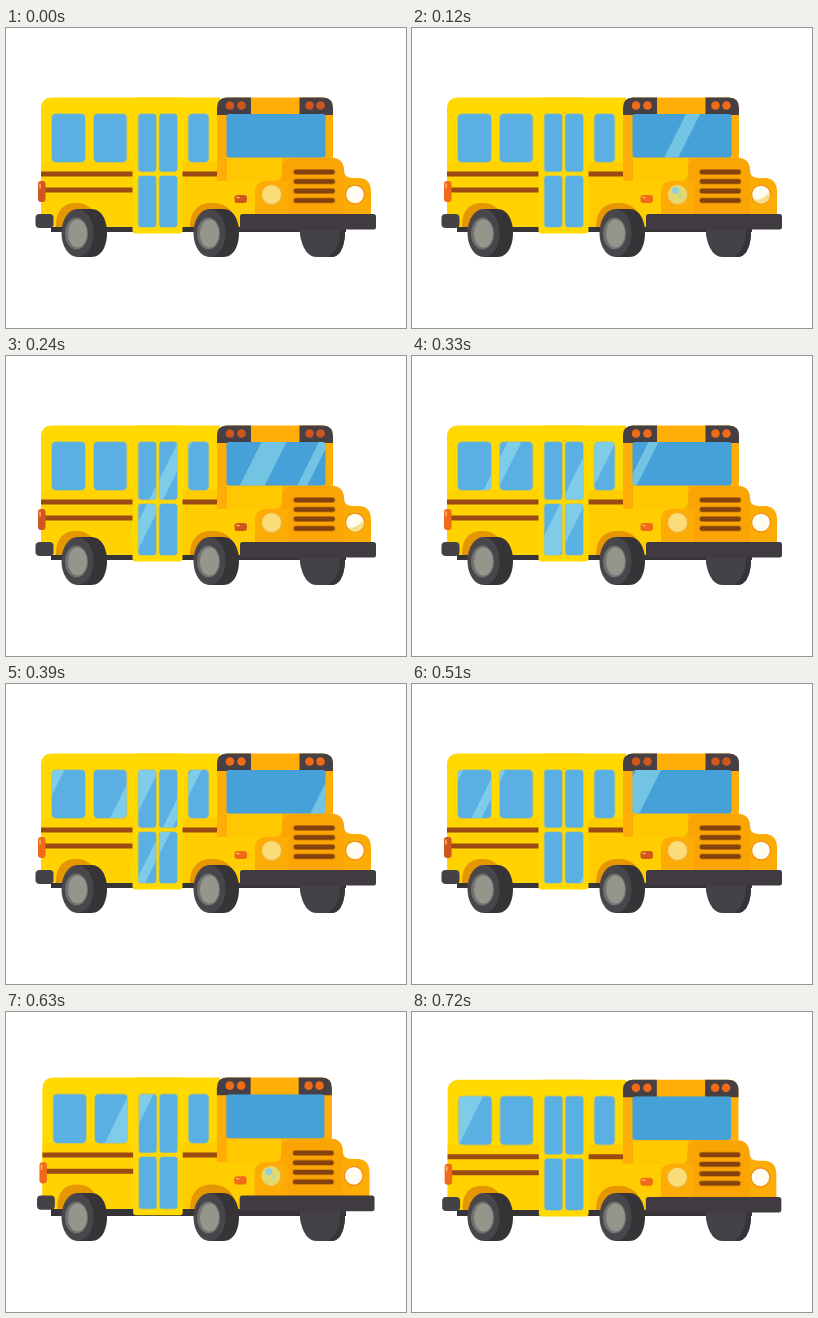
An HTML page that plays this animation: 400x300 px, repeating every 750 ms.

```html
<!DOCTYPE html>
<html lang="en">
<head>
<meta charset="utf-8">
<title>School bus</title>
<style>
  html, body { margin: 0; width: 100%; height: 100%; overflow: hidden; background: #fff; }
  svg { display: block; width: 400px; height: 300px; }
</style>
</head>
<body>
<svg viewBox="0 0 400 300">
  <defs>
    <g id="panes">
      <rect x="46" y="86" width="33" height="48" rx="4"/>
      <rect x="88" y="86" width="32.500" height="48" rx="4"/>
      <rect x="182.500" y="86" width="20" height="48" rx="4"/>
      <rect x="132.500" y="86" width="17.500" height="57.500" rx="3"/>
      <rect x="153.500" y="86" width="17.500" height="57.500" rx="3"/>
      <rect x="132.500" y="148" width="17.500" height="51" rx="3"/>
      <rect x="153.500" y="148" width="17.500" height="51" rx="3"/>
    </g>
    <clipPath id="glass">
      <rect x="46" y="86" width="33" height="48" rx="4"/>
      <rect x="88" y="86" width="32.500" height="48" rx="4"/>
      <rect x="182.500" y="86" width="20" height="48" rx="4"/>
      <rect x="132.500" y="86" width="17.500" height="57.500" rx="3"/>
      <rect x="153.500" y="86" width="17.500" height="57.500" rx="3"/>
      <rect x="132.500" y="148" width="17.500" height="51" rx="3"/>
      <rect x="153.500" y="148" width="17.500" height="51" rx="3"/>
      <rect x="220.500" y="86" width="99" height="43.500" rx="3"/>
    </clipPath>
    <g id="wheel">
      <path d="M0 181H14C24 181 29.500 192 29.500 205S24 229 14 229H0Z" fill="#363437"/>
      <ellipse cx="0" cy="205" rx="16" ry="24" fill="#48464a"/>
      <ellipse cx="-1" cy="205.500" rx="11.500" ry="16" fill="#70706e"/>
      <ellipse cx="0" cy="205.500" rx="9.500" ry="14" fill="#96958c"/>
    </g>
  </defs>

  <path d="M45 197H340V204H45Z" fill="#363437"/>
  <path d="M294 190H339V207Q337 229 325 229H311Q298 229 294 207Z" fill="#454247"/>
  <path d="M334 190H339V207Q337 229 325 229H322Q333 222 334 204Z" fill="#38353a"/>

  <g id="body">
    <path d="M47 69.500H214V199H47Q35 199 35 190V81Q35 69.500 47 69.500Z" fill="#ffd900"/>
    <path d="M35 134H212V199H47Q35 199 35 190Z" fill="#ffd200"/>
    <path d="M176 134H212V199H176Z" fill="#ffcc00"/>
    <path d="M35 143.500H127V148.500H35ZM35 159.500H127V164.500H35ZM176 143.500H212V148.500H176Z" fill="#9a4a12"/>
    <rect x="126.500" y="69.500" width="50" height="136" rx="3" fill="#ffd900"/>

    <path d="M211 80Q211 69.500 221 69.500H317Q327 69.500 327 80V186H211Z" fill="#ffae08"/>
    <path d="M221 130H276V153H221Z" fill="#ffc800"/>
    <path d="M211 153H262V199H211Z" fill="#ffcd00"/>
    <path d="M211 87V80Q211 69.500 221 69.500H245V87Z" fill="#463f43"/>
    <path d="M327 87V80Q327 69.500 317 69.500H293.500V87Z" fill="#463f43"/>

    <path d="M50 199V196Q51 175 70 175T91 196V199ZM184 199V196Q186 175 206 175T231 196V199Z" fill="#e59600"/>

    <path d="M249 187V163Q249 154 259 153H270Q276 152 276 143Q276 130 289 130H326Q337 130 338 142Q338 150 347 150H354Q365 151 365 164V187Z" fill="#fdac05"/>
    <path d="M276 143Q276 130 289 130H326Q337 130 338 142V187H282V153H276Z" fill="#fba504"/>
    <g id="grille" stroke-linecap="round">
      <path d="M290 144H326.500M290 153.500H326.500M290 163H326.500M290 172.500H326.500" stroke="#d58008" stroke-width="6"/>
      <path d="M290 144H326.500M290 153.500H326.500M290 163H326.500M290 172.500H326.500" stroke="#84420f" stroke-width="4.400"/>
    </g>

    <circle cx="266" cy="167" r="10.500" fill="#f0b030"/>
    <circle cx="265.500" cy="166.500" r="9.500" fill="#fadc78"/>
    <circle cx="349" cy="166.500" r="10" fill="#f08c14"/>
    <circle cx="349" cy="166.500" r="8.800" fill="#fffdf2"/>
    <path id="glow" d="M357.500 164A8.800 8.800 0 0 1 342 172Q352 172 357.500 164Z" fill="#f3e08a"/>
    <g id="spark">
      <circle cx="265.500" cy="166.500" r="9" fill="#e3d96c"/>
      <circle cx="263.500" cy="162.500" r="3.500" fill="#92d0df"/>
      <circle cx="268.500" cy="168" r="2" fill="#b5d8a8"/>
    </g>

    <g id="lamps">
      <circle cx="224" cy="77.500" r="4.300"/>
      <circle cx="235.500" cy="77.500" r="4.300"/>
      <circle cx="303.500" cy="77.500" r="4.300"/>
      <circle cx="314.500" cy="77.500" r="4.300"/>
      <rect x="32" y="153" width="7.500" height="21" rx="3"/>
      <rect x="228.500" y="167" width="12.500" height="8" rx="3"/>
    </g>
    <path d="M34 156V160M231 169.500H233" stroke="#ffb36a" stroke-width="1.500" stroke-linecap="round"/>

    <use href="#panes" fill="none" stroke="#c4c462" stroke-width="1.600"/>
    <g clip-path="url(#glass)">
      <rect x="30" y="80" width="180" height="125" fill="#5ab0e2"/>
      <rect x="210" y="80" width="120" height="55" fill="#45a1d7"/>
      <g id="shine" fill="#b4f2f0" opacity=".42"></g>
    </g>

    <rect x="29.500" y="186" width="18" height="14" rx="4" fill="#454247"/>
    <rect x="234" y="186" width="136" height="15.500" rx="2.500" fill="#3f3b40"/>
  </g>

  <use href="#wheel" x="71.500"/>
  <use href="#wheel" x="203.500"/>
</svg>
<script>
  const LOOP = 750, STEP = 30, SPEED = 0.85;
  // Reflections: [start x at windscreen height, width]
  const bands = [[372, 14], [461, 25], [511, 10], [659, 25]];

  const get = id => document.getElementById(id);
  const body = get("body"), lamps = get("lamps"), shine = get("shine");
  const spark = get("spark"), glow = get("glow");

  const strips = bands.map(([x, w]) => {
    const p = document.createElementNS("http://www.w3.org/2000/svg", "path");
    p.setAttribute("d", `M${14 - w / 2} 80h${w}l-62.500 125h${-w}z`);
    shine.append(p);
    return { p, x };
  });

  const within = (t, a, b) => t >= a && t < b;
  const show = (el, on) => el.setAttribute("opacity", on ? 1 : 0);

  function draw(t) {
    for (const { p, x } of strips) p.setAttribute("transform", `translate(${x - SPEED * t} 0)`);

    // The hop stretches the body a little while the wheels stay down
    const hop = t > 540 ? Math.sin(Math.PI * (t - 540) / 210) : 0;
    body.setAttribute("transform",
      `translate(200 ${186 - 2.5 * hop}) scale(${1 - 0.009 * hop} ${1 + 0.013 * hop}) translate(-200 -186)`);

    lamps.setAttribute("fill", within(t % 250, 60, 225) ? "#f06a18" : "#cf561c");
    show(spark, within(t, 90, 180) || within(t, 600, 690));
    show(glow, within(t, 90, 300));
  }

  function tick() {
    draw(Math.floor(performance.now() % LOOP / STEP) * STEP);
    requestAnimationFrame(tick);
  }
  tick();
</script>
</body>
</html>
```
